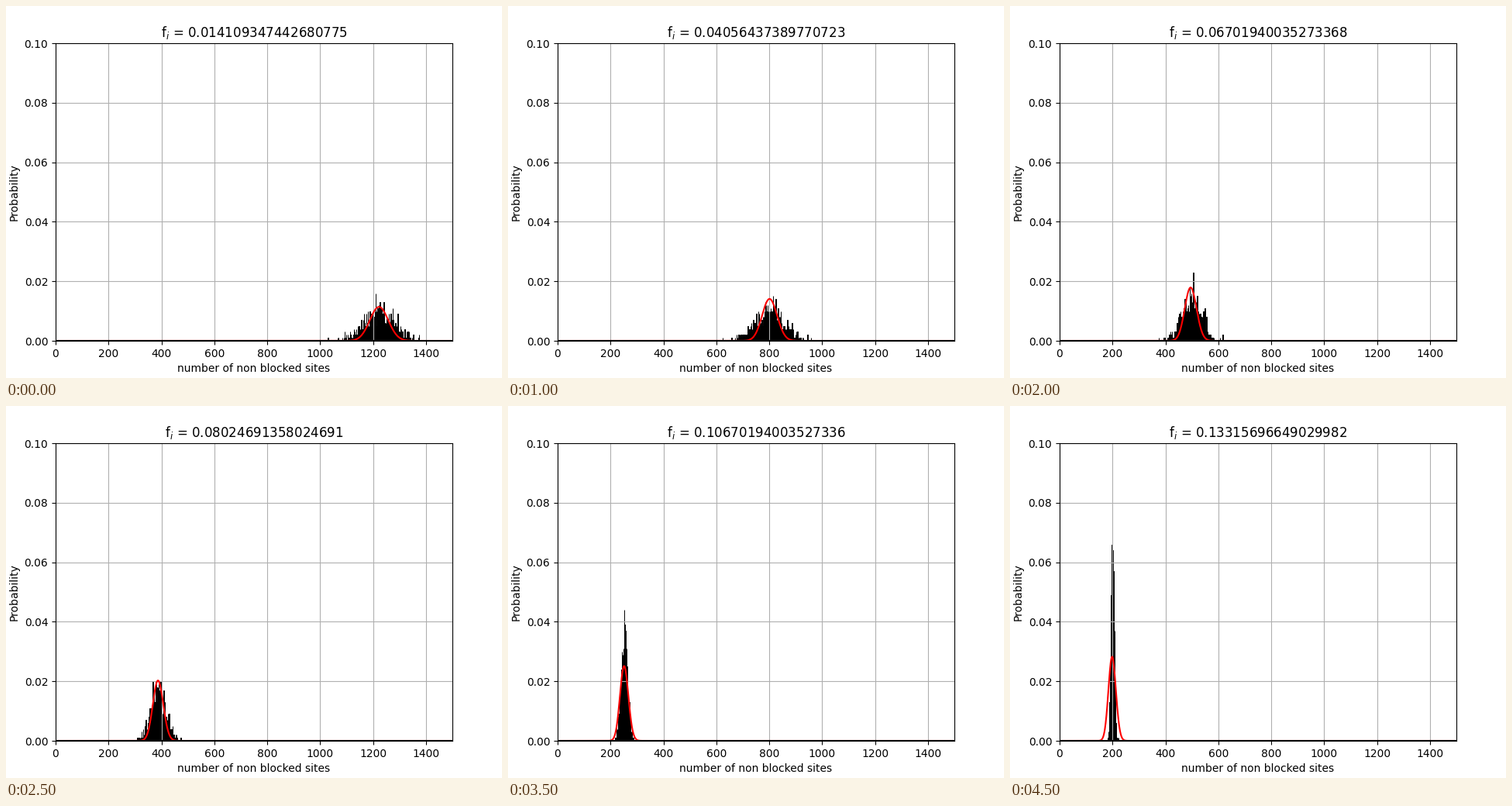
A matplotlib script for the animation above (5000 ms loop, 640 by 480 pixels).

```python
import numpy as np
import matplotlib.pyplot as plt
from matplotlib.animation import FuncAnimation

FRAMES = 10
SAMPLES = 1000
CELLS = 1134
SITES = np.arange(1500)
LOG_FACT = np.concatenate(([0.0], np.cumsum(np.log(SITES[1:]))))


def blockers(i):
    return 16 + 15 * i


def mean_free(i):
    # open sites thin out ever faster as blockers are added
    decay = i * (0.2085 + 0.0117 * i + 0.00055 * i**2)
    return blockers(i) + 1207 * np.exp(-decay)


def spread(i):
    return 51 / (1 + (i / 5) ** 3.4)


def poisson(mean):
    return np.exp(SITES * np.log(mean) - mean - LOG_FACT)


def draw_samples(i):
    rng = np.random.default_rng(40 + i)
    return np.rint(rng.normal(mean_free(i), spread(i), SAMPLES)).astype(int)


fig = plt.figure(figsize=(6.4, 4.8), dpi=100)
ax = fig.add_axes([0.1, 0.1, 0.8, 0.8])
ax.set_xlim(0, 1500)
ax.set_ylim(0, 0.1)
ax.set_xlabel("number of non blocked sites")
ax.set_ylabel("Probability")
ax.grid(True)
curve, = ax.plot(SITES, np.zeros(len(SITES)), color="red")
ax.axhline(0, color="black")
bars = []


def update(i):
    while bars:
        bars.pop().remove()
    values = draw_samples(i)
    bins = np.arange(values.min(), values.max() + 2)
    bars.append(ax.hist(values, bins=bins, density=True, color="black",
                        edgecolor="black", linewidth=0.7)[2])
    curve.set_ydata(poisson(mean_free(i)))
    ax.set_title(f"f$_i$ = {blockers(i) / CELLS}")
    return [curve]


anim = FuncAnimation(fig, update, frames=FRAMES, interval=500,
                     init_func=lambda: [curve], repeat=True, blit=False)
plt.show()
```
